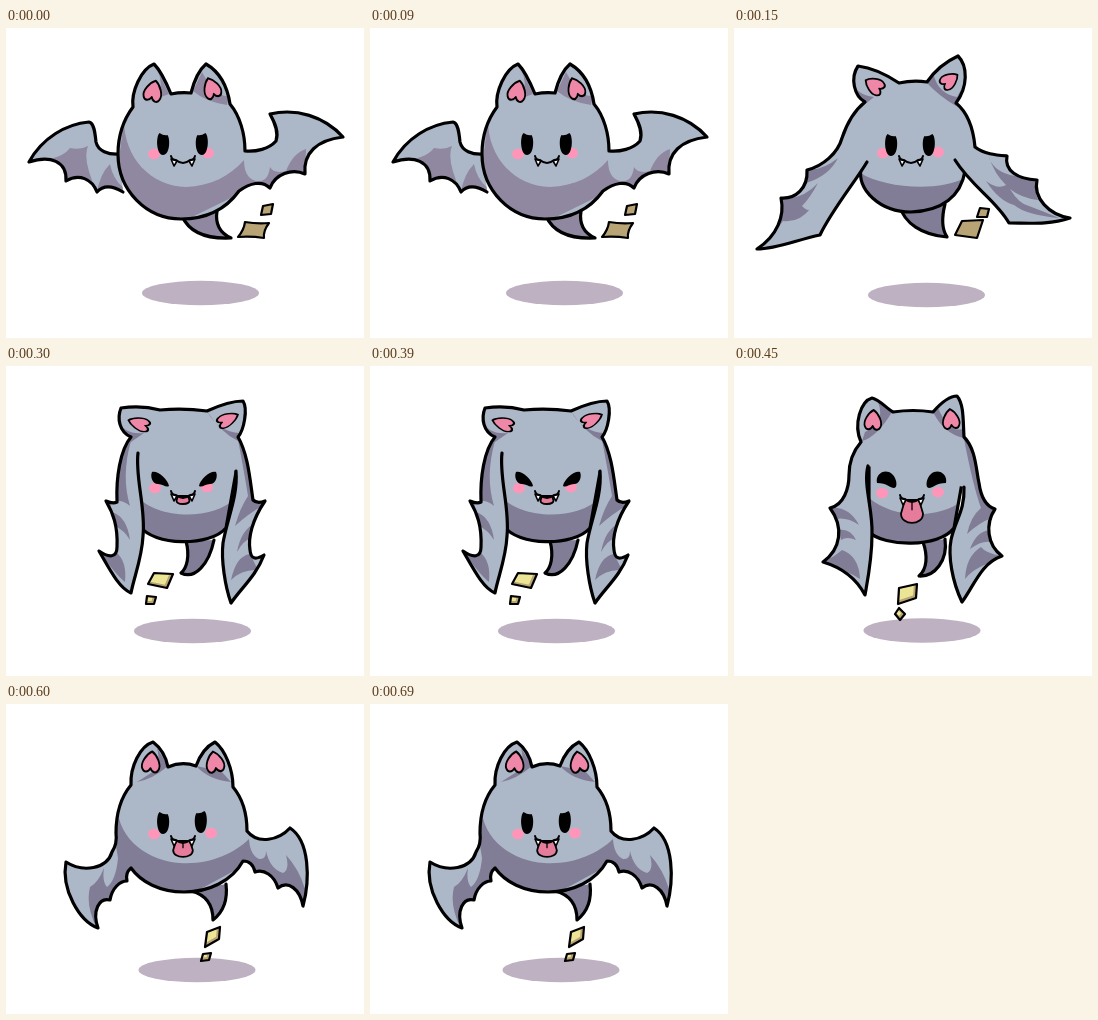
Animation of 358 by 310 pixels, one loop 750 ms. Source, as an HTML page with a canvas:

```html
<!DOCTYPE html>
<html lang="en">
<head>
<meta charset="utf-8">
<title>Flapping bat</title>
<style>
html, body { margin: 0; width: 100%; height: 100%; overflow: hidden; background: #fff; }
canvas { display: block; }
</style>
</head>
<body>
<canvas id="stage" width="358" height="310"></canvas>
<script>
const ctx = document.getElementById('stage').getContext('2d');
const INK = '#000', FUR = '#acb8c8', DUSK = '#827d97', PINK = '#ef87a8', BLUSH = '#ff96b9';
const TAN = '#b9a475', GOLD = '#ece596';
const POSE_MS = 150;

const HEART = 'M0-11C6-8 12 1 9 6C7 10 2 9 0 5C-2 9-7 10-9 6C-12 1-6-8 0-11Z';
const EYES = {
  open: 'M-3.5-11C-7.5-7-6.5 11 0 11C7 11 7.5-5 4.5-9Q1-8-3.5-11Z',
  squint: 'M-8-7C-3-9 8 0 9 7C6 9 3 5-2 5C-8 5-10-3-8-7Z',
  happy: 'M-9 3C-11-6-1-12 6-6C11-2 12 8 8 8C4 8 1 3-9 3Z'
};

// Parts are painted back to front: [outline, shading]. Open ends are left without a line.
const poses = [
  {
    ground: [194.5, 265], dusk: '#8f88a0',
    tail: 'M176 188C184 206 204 211 225 210C214 205 209 196 211 183',
    parts: [
      ['M114 126C102 127 92 123 90 114C89 104 88 95 83 94C60 96 36 110 23 134C44 127 61 133 60 153C73 145 86 151 91 164C98 156 107 158 117 164',
       'M44 131Q58 128 64 120Q75 122 82 118Q76 132 91 164L60 156Q62 134 44 131Z M91 164Q94 146 104 136Q107 152 118 160V170H90Z'],
      ['M127 79C125 64 135 41 148 36C154 42 160 54 165 66Q175 64 185 65C188 53 193 42 200 36C212 43 221 56 224 76C234 88 239 106 239 123C250 124 263 121 270 113C273 104 269 95 264 86C290 80 318 88 337 109C311 112 297 125 299 146C286 140 269 146 264 160C256 152 244 155 233 163C220 181 200 191 175 191C141 191 112 163 112 126C112 107 118 91 127 79Z',
       'M118 92C118 130 145 158 180 159C205 158 224 148 238 132Q238 150 250 153Q262 155 264 139Q268 146 280 143Q287 125 300 121L299 150L265 163L233 166L176 194H105Z M131 76Q145 73 163 66L152 43Q159 60 148 72Z M187 63Q200 74 221 77L223 68Q210 70 196 44Z']
    ],
    hearts: [[147, 64, 14, 0.9, 1.05], [206, 61, -20, 0.85, 1.05]],
    eye: 'open', eyes: [157, 116, 196, 116], cheeks: [148, 126, 202, 125], mouth: [177, 132, 0],
    chips: ['M239 194Q251 196 263 195Q257 203 258 210Q245 208 232 209Q238 202 239 194Z', 'M257 178L267 176L265 186L255 187Z'], chip: TAN, edge: TAN
  },
  {
    ground: [192.5, 267],
    tail: 'M166 178C170 195 188 207 213 209C207 200 208 188 211 176',
    parts: [
      ['M140 115L127 140C123 162 146 184 177 184C208 183 227 168 231 143L215 115',
       'M120 140C140 160 207 166 234 148V190H118Z'],
      ['M133 134C121 154 98 182 86 207C62 212 43 221 23 221C43 208 51 188 47 170C62 171 74 160 73 142C89 138 104 125 108 110C113 95 121 82 131 74C120 68 116 50 124 38C140 40 153 47 165 55Q179 52 193 54C202 41 213 33 224 28C234 38 234 59 222 75C233 84 239 97 241 119C250 126 262 127 273 128C270 143 284 151 303 152C299 170 315 187 336 190C315 197 295 195 275 195C262 172 238 159 221 132',
       'M48 168Q66 174 84 155Q76 170 68 178Q74 184 76 181Q65 195 49 193L38 208Q53 184 48 168Z M74 141Q88 143 104 130Q95 148 72 155Z M254 127Q258 142 276 147L303 152Q300 163 304 172Q287 170 276 161Q285 176 295 178L313 185L325 190Q292 187 280 177Q265 173 252 153Q264 162 272 157Q261 147 254 127Z M117 52Q122 67 140 69L130 77L112 66Z M200 48Q205 66 223 69L228 60L222 78Q205 68 193 55Z']
    ],
    hearts: [[141, 58, -58, 0.8, 1], [215, 53, 54, 0.75, 0.95]],
    eye: 'open', eyes: [157, 117, 195, 117], cheeks: [149, 125, 204, 124], mouth: [177, 132, 0],
    chips: ['M228 193L249 192L243 210L221 207Z', 'M246 180L255 181L253 189L243 189Z'], chip: TAN, edge: TAN
  },
  {
    ground: [186.5, 265],
    tail: 'M180 175C184 190 181 202 175 207C189 214 203 198 208 174',
    parts: [
      ['M130 84L134 160C147 180 204 181 220 162L234 84',
       'M130 129C149 153 205 156 230 132V185H128Z'],
      ['M132 87C129 112 140 142 137 170C136 192 128 211 125 227C113 222 104 204 93 185C103 192 111 192 111 181C112 160 107 147 100 135Q107 138 111 136C110 112 114 84 125 71C113 66 111 52 115 42C128 40 143 41 154 44Q178 42 201 45C212 40 226 35 237 35C242 43 238 64 232 71C242 88 244 114 247 134Q251 138 259 135C246 154 242 172 244 184Q245 197 258 189C250 210 236 221 225 237C219 220 215 194 217 177C221 153 232 131 230 105',
       'M125 75Q115 110 124 140Q112 130 104 140V90Z M106 146Q121 151 124 174Q118 164 109 160Z M93 185Q104 194 111 187Q121 196 119 216Q109 208 93 185Z M232 74Q238 105 242 130Q234 142 229 160Q242 148 256 140L246 100Z M249 157Q235 164 231 186Q238 174 245 172Z M244 188Q230 190 225 214Q236 203 252 204Z M112 54Q118 69 138 67L125 76L108 70Z M201 45Q212 66 234 67L232 75Q214 66 201 45Z']
    ],
    hearts: [[134, 58, -72, 0.65, 1.1], [221, 54, 64, 0.65, 1.1]],
    eye: 'squint', eyes: [154, 113, 202, 113], cheeks: [149, 122, 201, 121], mouth: [177, 129, 9],
    chips: ['M148 207L167 208L161 222L142 218Z', 'M141 230L150 231L148 238L140 238Z'], chip: GOLD, edge: TAN
  },
  {
    ground: [188, 264.5],
    tail: 'M189 176C194 190 193 203 185 210C201 211 214 194 211 173',
    parts: [
      ['M135 92L135 166C150 181 205 182 220 162L231 100',
       'M130 127C152 152 202 155 228 135V187H130Z'],
      ['M134 100C129 118 139 144 138 168C138 193 134 212 131 229C122 212 106 201 89 196C107 183 110 161 96 142C110 139 115 122 115 109C115 93 121 83 127 76C119 58 127 35 138 32C146 34 152 42 159 46Q179 43 199 46C206 38 214 30 223 30C230 38 229 55 230 71C242 83 242 104 245 117Q248 139 261 143C251 158 253 179 268 190C247 197 240 220 228 236C218 215 214 190 217 174C221 154 231 145 230 121',
       'M96 142Q115 140 125 159Q113 151 102 153Z M105 164Q116 162 122 174Q113 170 107 174Z M88 197Q100 191 108 184Q125 190 126 213Q112 204 88 197Z M230 73Q239 120 247 142Q237 150 233 168Q246 156 258 152L262 140L244 90Z M255 164Q242 166 236 183Q248 174 257 176Z M270 190Q252 188 247 181Q232 190 231 213Q243 198 270 194Z M128 75Q143 71 158 46L144 36Q152 57 131 66Z M199 46Q210 68 230 72L228 63Q215 67 204 42Z']
    ],
    hearts: [[139, 55, 4, 0.85, 1], [217, 54, -6, 0.85, 1]],
    eye: 'happy', eyes: [152, 114, 203, 114], cheeks: [148, 127, 204, 126], mouth: [178, 133, 24],
    chips: ['M165 222L183 218L182 232L164 238Z', 'M165 242L171 248L166 254L161 248Z'], chip: GOLD, edge: TAN
  },
  {
    ground: [191, 266],
    tail: 'M185 187C201 191 207 202 207 216C216 209 222 197 220 180',
    parts: [
      ['M125 81C124 63 134 42 147 38C155 44 160 53 162 63Q176 57 190 62C194 51 201 42 209 38C219 46 227 65 227 83C237 95 241 109 241 127C252 141 273 136 284 124C304 137 304 176 297 202C294 185 282 176 272 184C268 171 258 165 249 168C247 159 242 157 237 157C226 177 203 188 178 188C154 188 135 178 125 164Q119 169 121 177C114 177 106 184 104 196C93 193 86 207 92 224C73 217 55 185 60 158C77 169 101 165 106 148C110 142 111 137 110 129C110 110 115 93 125 81Z',
       'M111 101C112 137 144 157 174 159C202 161 228 150 243 135Q244 151 253 155Q260 156 260 147Q264 165 277 169Q284 166 280 151Q293 165 299 185L297 204L272 186L249 172L237 162L178 194L125 170L121 180L104 199L92 227Q79 202 84 183Q92 179 98 164Q96 178 101 183Q110 176 112 154Q106 122 111 101Z M131 78Q147 75 162 62L151 44Q156 62 145 69Z M190 62Q203 76 225 78L215 67Z']
    ],
    hearts: [[145, 59, 6, 0.9, 1.05], [209, 59, -10, 0.9, 1.05]],
    eye: 'open', eyes: [157, 119, 195, 118], cheeks: [148, 130, 205, 129], mouth: [177, 136, 17],
    chips: ['M201 228L214 223L213 235L199 243Z', 'M197 250L205 249L203 256L195 257Z'], chip: GOLD, edge: TAN
  }
];

function fill(path, color) {
  ctx.fillStyle = color;
  ctx.fill(path);
}

function line(path, width) {
  ctx.lineWidth = width;
  ctx.stroke(path);
}

function at(x, y, draw, angle = 0, sx = 1, sy = sx) {
  ctx.save();
  ctx.translate(x, y);
  ctx.rotate(angle * Math.PI / 180);
  ctx.scale(sx, sy);
  draw();
  ctx.restore();
}

function ellipse(x, y, rx, ry, color) {
  const path = new Path2D();
  path.ellipse(x, y, rx, ry, 0, 0, Math.PI * 2);
  fill(path, color);
}

function part(outline, shading, color, dusk) {
  const path = new Path2D(outline);
  fill(path, color);
  ctx.save();
  ctx.clip(path);
  fill(new Path2D(shading), dusk);
  ctx.restore();
  line(path, 3.2);
}

function chip(outline, color, edge) {
  const path = new Path2D(outline);
  fill(path, color);
  if (edge !== color) {
    ctx.save();
    ctx.clip(path);
    ctx.strokeStyle = edge;
    at(-1, -1, () => line(path, 4));
    ctx.restore();
  }
  line(path, 2.2);
}

function mouth(length) {
  if (length) {
    const half = length > 10 ? 7 : 5;
    const wide = half + length / 6;
    const tongue = new Path2D(`M${-half} 1L${-wide} ${length * 0.6}C${-wide} ${length * 1.13} ${wide} ${length * 1.13} ${wide} ${length * 0.6}L${half} 1Z`);
    fill(tongue, '#e67c9c');
    line(tongue, 1.8);
    if (length > 10) line(new Path2D(`M0 4V${length * 0.45}`), 1.3);
  }
  for (const side of [-1, 1]) {
    at(0, 0, () => {
      const fang = new Path2D('M6 1L9 6L12-1Z');
      fill(fang, '#fff');
      line(fang, 1.6);
    }, 0, side, 1);
  }
  line(new Path2D('M-12-4Q-11 0-7 0Q0 6 7 0Q11 0 12-4'), 2);
}

function draw(pose) {
  ctx.fillStyle = '#fff';
  ctx.fillRect(0, 0, 358, 310);
  ctx.lineJoin = ctx.lineCap = 'round';
  ctx.strokeStyle = INK;

  const dusk = pose.dusk || DUSK;
  ellipse(...pose.ground, 58.5, 12.3, '#beb1c1');
  part(pose.tail, '', dusk, dusk);
  for (const [outline, shading] of pose.parts) part(outline, shading, FUR, dusk);

  const heart = new Path2D(HEART);
  for (const [x, y, angle, sx, sy] of pose.hearts) {
    at(x, y, () => { fill(heart, PINK); line(heart, 2); }, angle, sx, sy);
  }

  const [ax, ay, bx, by] = pose.cheeks;
  ellipse(ax, ay, 6, 5.3, BLUSH);
  ellipse(bx, by, 6, 5.3, BLUSH);

  const eye = new Path2D(EYES[pose.eye]);
  const [lx, ly, rx, ry] = pose.eyes;
  at(lx, ly, () => fill(eye, INK));
  at(rx, ry, () => fill(eye, INK), 0, -1, 1);

  const [mx, my, tongue] = pose.mouth;
  at(mx, my, () => mouth(tongue));
  for (const outline of pose.chips) chip(outline, pose.chip, pose.edge);
}

const start = performance.now();
function tick() {
  const step = Math.floor((performance.now() - start) / POSE_MS);
  draw(poses[step % poses.length]);
  requestAnimationFrame(tick);
}
tick();
</script>
</body>
</html>
```
